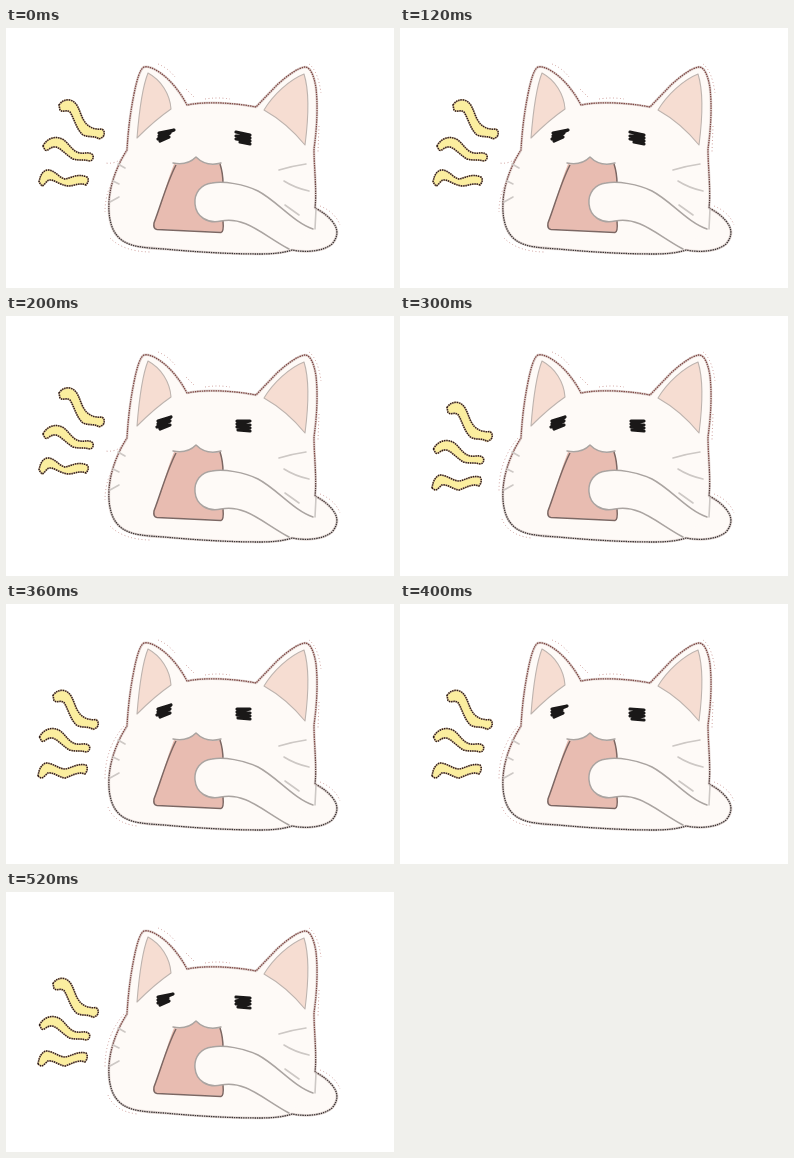
An HTML page that plays this animation: 388 px wide and 260 px high, repeating every 600 ms.

```html
<!DOCTYPE html>
<html lang="en">
<head>
<meta charset="utf-8">
<title>Yawning cat</title>
<style>
  html, body { margin: 0; width: 100%; height: 100%; overflow: hidden; background: #fff; }
  svg { display: block; width: 388px; height: 260px; fill: none; stroke-linejoin: round; }

  .rim { stroke: #e2d7d4; stroke-width: 2.6; }
  .edge { stroke: url(#edge-tint); stroke-width: 1.3; stroke-dasharray: 1.5 .8; }
  .halo { stroke: #c58b86; stroke-width: .9; stroke-dasharray: .9 2.6; }
  .line { stroke: #aaa4a1; stroke-width: 1.5; stroke-linecap: round; }
  .whisker { stroke: #cdc8c5; stroke-width: 1.6; stroke-linecap: round; }
  .ear { fill: #f6ddd2; stroke: #bdb3ae; stroke-width: 1.1; }
  .eyes { stroke: #1a1818; stroke-width: 3.2; stroke-linecap: round; }

  .soft { fill: #fbee9f; stroke: #cbb191; stroke-width: 1.6; }
  .stitch { stroke: #2a1c1c; stroke-width: 1.5; stroke-dasharray: 1.3 1; }

  .step { visibility: hidden; animation: 600ms step-end infinite; }
  .eyes-a { animation-name: first-third; }
  .eyes-b { animation-name: middle-third; }
  .eyes-c { animation-name: last-third; }
  .half-a { animation-name: first-half; }
  .half-b { animation-name: second-half; }

  @keyframes first-third { 0% { visibility: visible } 33.3333%, 100% { visibility: hidden } }
  @keyframes middle-third { 0% { visibility: hidden } 33.3333% { visibility: visible } 66.6667%, 100% { visibility: hidden } }
  @keyframes last-third { 0% { visibility: hidden } 66.6667%, 100% { visibility: visible } }
  @keyframes first-half { 0% { visibility: visible } 50%, 100% { visibility: hidden } }
  @keyframes second-half { 0% { visibility: hidden } 50%, 100% { visibility: visible } }
</style>
</head>
<body>
<svg viewBox="0 0 388 260">
  <defs>
    <linearGradient id="edge-tint" gradientUnits="userSpaceOnUse" x1="0" y1="40" x2="0" y2="220">
      <stop offset=".55" stop-color="#7d4743"/>
      <stop offset=".85" stop-color="#3a3434"/>
    </linearGradient>

    <path id="body" d="M138 39 C134 41 131 51 128 66 C124 86 122 104 121 122
      C113 134 104 154 103 174 C102 191 106 206 117 213 C126 219 141 220 158 221
      C190 224 224 226 254 226 C267 226 277 225 286 222 C301 225 318 223 326 216
      C333 208 332 200 326 193 C321 187 315 183 309 180 C311 163 308 140 308 121
      C311 99 312 78 310 60 C308 47 304 39 299 39 C291 40 281 48 271 57 L250 79
      C230 75 200 73 181 77 C175 65 164 51 153 44 C147 40 142 38 138 39 Z"/>
    <path id="arm" d="M307 201 C287 194 271 173 252 163 C238 156 218 153 206 155 C195 156 188 165 189 176
      C190 189 202 196 215 193 C239 188 257 207 283 221"/>

    <path id="wave-top" d="M53 77 Q57 71 64 72 C72 74 73 83 77 91 C81 99 88 102 96 101 Q100 104 97 109
      L93 111 C88 107 84 110 77 107 C70 101 69 92 64 84 C60 81 57 85 54 82 Z"/>
    <path id="wave-mid" d="M37 118 C41 110 50 107 58 112 C64 117 67 124 74 125 C79 126 83 123 87 127
      Q88 132 84 133 C77 131 74 133 67 131 C60 127 56 121 50 119 C44 118 42 124 39 122 Z"/>
    <path id="wave-low" d="M33 154 C34 148 37 142 42 142 C49 142 53 150 59 151 C66 150 71 145 81 149
      Q84 152 80 157 C73 154 69 158 62 158 C53 157 48 151 43 152 C40 153 39 157 36 158 Z"/>
    <path id="wave-low-next" d="M32 172 C33 165 36 160 40 159 C47 159 53 165 59 165 C66 164 71 159 80 161
      Q83 165 79 170 C72 167 66 172 59 174 C52 173 48 168 42 169 C40 170 38 174 35 174 Z"/>

    <g id="waves-up">
      <use href="#wave-top"/>
      <use href="#wave-mid"/>
      <use href="#wave-low"/>
    </g>
    <g id="waves-down">
      <use href="#wave-top" transform="translate(-6 14.5)"/>
      <use href="#wave-mid" transform="translate(-3.5 15)"/>
      <use href="#wave-low-next"/>
    </g>
  </defs>

  <g class="halo">
    <path d="M152 36 Q162 40 169 49 M180 61 L188 69 M199 71 Q212 69 224 71
      M303 36 Q312 43 315 65 M313 98 L312 124 M314 178 Q329 184 334 197"/>
    <path class="step half-a" d="M121 123 Q114 137 99 135 M108 150 Q99 166 99 184 M104 210 Q118 224 146 224"/>
    <path class="step half-b" d="M118 122 Q99 144 99 175 M102 203 Q108 219 131 222"/>
  </g>

  <use href="#body" class="rim" fill="#fefaf7"/>
  <use href="#body" class="edge"/>

  <path class="ear" d="M142 45 C155 52 164 66 165 81 Q149 92 131 110 C133 85 136 60 142 45 Z"/>
  <path class="ear" d="M298 46 C283 52 267 67 258 82 Q281 95 299 117 C302 94 304 65 298 46 Z"/>

  <path d="M168 136 Q181 138 190 129 Q200 139 214 136 Q217 145 217 156 L217 204 L151 201 Q147 200 148 195
    C155 177 161 153 168 136 Z" fill="#e8bcb1"/>
  <path d="M170 137 C161 154 155 177 148 195 Q147 201 151 201.5 L215 204.5 Q218 204 217 193 M214 136 Q217 145 217 156"
    stroke="#7c6763" stroke-width="1.5"/>
  <path class="line" d="M167 135 Q181 138 190 129 Q200 139 215 135"/>

  <use href="#arm" fill="#fefaf7"/>
  <use href="#arm" class="line"/>

  <path class="whisker" d="M273 142 Q286 138 300 136 M278 153 Q289 160 303 163 M279 177 L293 187
    M310 181 L309 201 M112 136 L119 140 M107 153 L113 156 M104 174 L113 169"/>

  <g class="eyes">
    <path class="step eyes-a" d="M153 105 L168 102 L153 108 L164 105 L152 111 L163 109 L154 113
      M230 104 L244 107 L230 108 L244 110 L230 111 L244 113 L234 114 L244 116"/>
    <path class="step eyes-b" d="M152 105 L165 101 L152 108 L164 105 L151 111 L164 109 L154 113
      M231 105 L244 105 L231 108 L244 109 L231 111 L244 112 L232 114 L244 115"/>
    <path class="step eyes-c" d="M152 105 L167 102 L152 108 L162 106 L152 111 L163 109 L154 113
      M230 105 L244 106 L230 109 L244 109 L230 112 L244 112 L232 115 L244 116"/>
  </g>

  <g class="step half-a">
    <use href="#waves-up" class="soft"/>
    <use href="#waves-up" class="stitch"/>
  </g>
  <g class="step half-b">
    <use href="#waves-down" class="soft"/>
    <use href="#waves-down" class="stitch"/>
  </g>
</svg>
</body>
</html>
```
